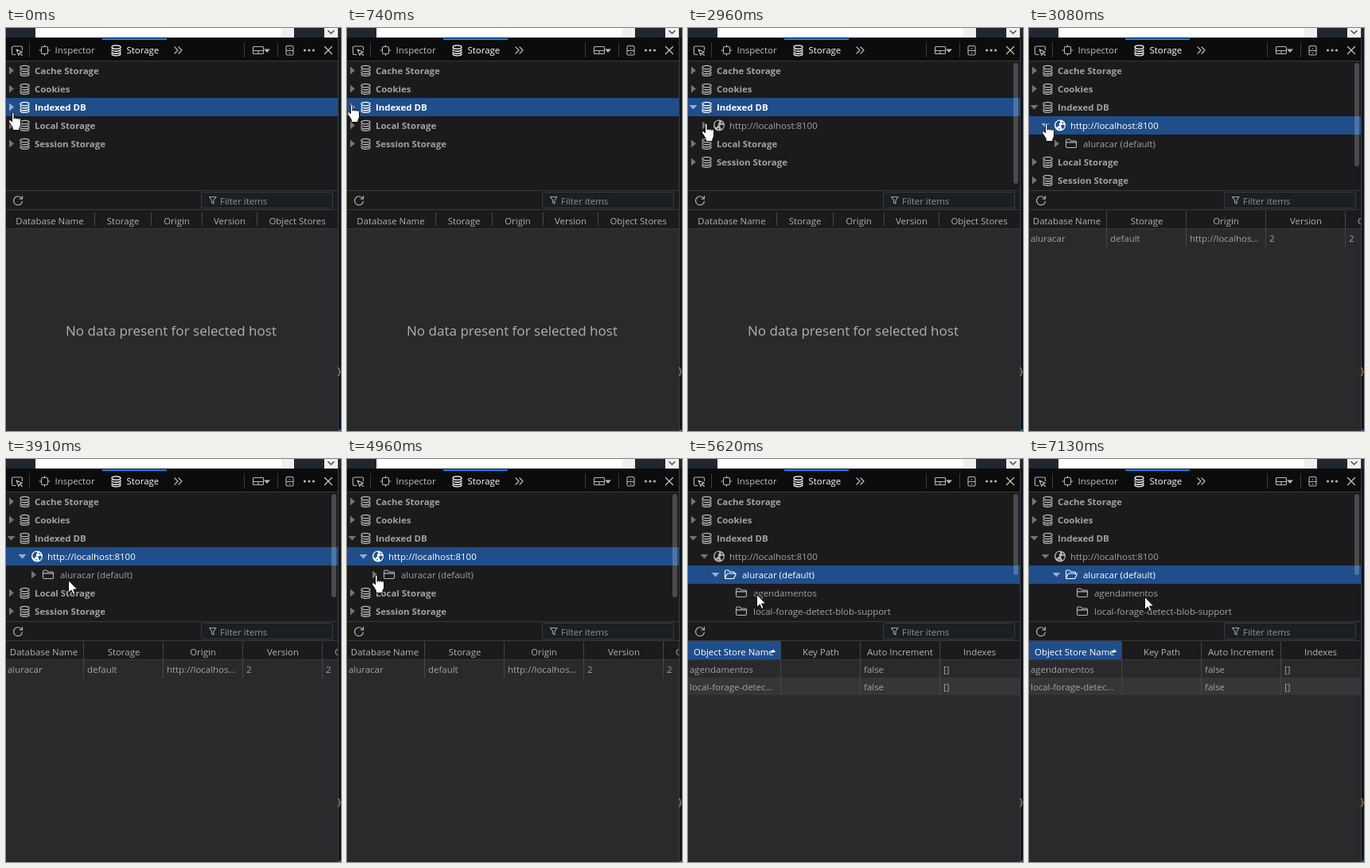
Animation of 421 by 507 pixels, one loop 8 s. Source, as an HTML page:

```html
<!DOCTYPE html>
<html lang="en">
<head>
<meta charset="utf-8">
<title>Storage inspector</title>
<style>
html, body { margin: 0; width: 100%; height: 100%; overflow: hidden; background: #1b1b1d; }
svg { display: block; width: 100vw; height: 100vh; }
text { font: 11.45px "Open Sans", "Noto Sans", sans-serif; fill: #a2a2a4; white-space: pre; }
.bold { font-weight: 700; }
.head { fill: #b1b1b3; }
.on { fill: #fff; }
.mid { text-anchor: middle; }
</style>
</head>
<body>
<svg id="stage" viewBox="0 0 421 507"></svg>
<script>
const LOOP = 8000;
const GREY = '#a2a2a4', ICON = '#b8b8ba', LINE = '#3a3a3e', DARK = '#1b1b1d', BODY = '#2a2a2d', BLUE = '#204e8a';

const rect = (x, y, w, h, fill, more = '') =>
  `<rect x="${x}" y="${y}" width="${w}" height="${h}" fill="${fill}" ${more}/>`;
const text = (x, y, s, cls = '', more = '') => `<text x="${x}" y="${y}" class="${cls}" ${more}>${s}</text>`;
const stroke = (d, color = GREY, w = 1.1, fill = 'none') =>
  `<path d="${d}" fill="${fill}" stroke="${color}" stroke-width="${w}" stroke-linejoin="round" stroke-linecap="round"/>`;
const at = (x, y, s) => `<g transform="translate(${x} ${y})">${s}</g>`;
const vline = (x, y, h, color = LINE) => rect(x, y, 1, h, color);

// Icons, centred on 0,0
const icons = {
  db: c => stroke('M-5.5-4a5.5 2.2 0 1 1 11 0a5.5 2.2 0 1 1-11 0M-5.5-1c0 3 11 3 11 0M-5.5 2c0 3 11 3 11 0M-5.5 4.6c0 3 11 3 11 0', c, 1.3),
  globe: (c, bg) => `<circle r="7" fill="${c}"/><path d="M-5.5-2l2-3 3-1 1 2-2 2 1 2-2 1-1 2-2-2zM1 0l3-1 2 1-1 3-2 2-1-2zM2-5l3 2-2 1zM-2 3l2 1-1 2z" fill="${bg}"/>`,
  folder: c => stroke('M-6.5-3.8q0-1.7 1.5-1.7h3l1.7 2h5.3q1.5 0 1.5 1.5v5.5q0 1.5-1.5 1.5h-10q-1.5 0-1.5-1.5zM-6-1.6h12', c),
  open: c => stroke('M-6.5 4v-8q0-1.5 1.5-1.5h3l1.7 2h4.3q1.5 0 1.5 1.5v1M-6.5 4.5l2.4-5q.4-1 1.4-1h9.2q1 0 .6 1l-2 4.5q-.4 1-1.4 1h-9q-1.2 0-1.2-.5z', c)
};
const twisty = (x, y, open, c) =>
  at(x, y, `<path d="${open ? 'M-5-2.5h10L0 3z' : 'M-2.5-5v10L3.5 0z'}" fill="${c}"/>`);

function treeRow([label, level, icon, state], i, selected) {
  const y = 53.5 + 23 * i, on = i === selected;
  return (on ? rect(0, 42 + 23 * i, 417, 23, BLUE) : '') +
    (state ? twisty(6.5 + 14 * level, y, state === 'v', on ? '#9aadca' : '#747476') : '') +
    at([23.5, 39, 53, 67][level], y, icons[icon](on ? '#fff' : ICON, on ? BLUE : DARK)) +
    text([36, 52, 68, 82][level], y + 4.3, label, (level ? '' : 'bold') + (on ? ' on' : ''));
}

const cut = (edges, y, h) => edges.map(x => vline(x, y, h, '#454549')).join('');
const heads = list => list.map(([x, s]) => text(x, 246.8, s, 'mid head')).join('');
const cells = (y, list) => list.map(([x, s]) => text(x, y, s)).join('');

const emptyTable =
  cut([111, 182, 246, 315], 232, 17) +
  heads([[55, 'Database Name'], [147, 'Storage'], [214.5, 'Origin'], [281, 'Version'], [366, 'Object Stores']]) +
  text(207.5, 387, 'No data present for selected host', 'mid head', 'style="font-size:17.05px"');

const dbTable =
  cut([97, 197, 297, 397], 230, 46) +
  heads([[47.5, 'Database Name'], [148, 'Storage'], [247.5, 'Origin'], [348, 'Version']]) +
  text(413, 246.8, 'Object Stores', 'head') +
  cells(269, [[2, 'aluracar'], [102, 'default'], [202, 'http://localhos...'], [302, '2'], [402, '2']]);

const storeTable =
  rect(0, 275, 417, 22, '#363638') + rect(0, 229, 116, 23, BLUE) +
  cut([116, 216, 316], 230, 67) +
  text(7, 246.8, 'Object Store Name', 'on') +
  '<path d="M104 243l3.2-3.5 3.2 3.5z" fill="#fff"/>' +
  heads([[167, 'Key Path'], [266.5, 'Auto Increment'], [366.5, 'Indexes']]) +
  cells(269, [[2, 'agendamentos'], [221, 'false'], [321, '[]']]) +
  cells(291, [[2, 'local-forage-detec...'], [221, 'false'], [321, '[]']]);

const root = (name, state = '>') => [name, 0, 'db', state];
const host = state => ['http://localhost:8100', 1, 'globe', state];
const top2 = [root('Cache Storage'), root('Cookies')];
const rest = [root('Local Storage'), root('Session Storage')];
const opened = [...top2, root('Indexed DB', 'v')];

const views = [
  { from: 0, rows: [...top2, root('Indexed DB'), ...rest], sel: 2, bar: 0, table: emptyTable },
  { from: 1860, rows: [...opened, host('>'), ...rest], sel: 2, bar: 152, table: emptyTable },
  { from: 3080, rows: [...opened, host('v'), ['aluracar (default)', 2, 'folder', '>'], ...rest], sel: 3, bar: 130, table: dbTable },
  { from: 5080, rows: [...opened, host('v'), ['aluracar (default)', 2, 'open', 'v'],
      ['agendamentos', 3, 'folder'], ['local-forage-detect-blob-support', 3, 'folder']], sel: 4, bar: 102, table: storeTable }
];

const drawView = v => `<g class="view" clip-path="url(#panel)">` +
  v.rows.map((r, i) => treeRow(r, i, v.sel)).join('') +
  (v.bar ? rect(409, 44, 6, v.bar, '#fff', 'opacity=".21" rx="3"') : '') + v.table + '</g>';

const toolbar =
  rect(0, 13, 417, 28, '#0c0c0d') + rect(0, 41, 417, 1, LINE) +
  stroke('M12 33.5h-3q-1.5 0-1.5-1.5v-7.5q0-1.5 1.5-1.5h10q1.5 0 1.5 1.5v3', ICON) +
  stroke('M13 27l7.5 3.2-3.2 1.1-1.3 3.2zM17.5 31.5l3 3', ICON) +
  vline(29, 18, 19) +
  stroke('M46 23.5h5q1.5 0 1.5 1.5v6q0 1.5-1.5 1.5h-5q-1.5 0-1.5-1.5v-6q0-1.5 1.5-1.500zM48.5 21.500v2M48.5 32.5v2M42 28h2.5M52.5 28h2.5', ICON) +
  text(61.5, 32, 'Inspector', '', 'style="fill:#c0c0c2"') +
  rect(121, 13, 81, 2, '#0a84ff') +
  at(138.5, 28, icons.db('#fff')) + text(151.5, 32, 'Storage', 'on') +
  stroke('M212 24l4 4-4 4M217 24l4 4-4 4', ICON, 1.3) +
  vline(299, 18, 19) +
  stroke('M311.5 23.5h11q1 0 1 1v7q0 1-1 1h-11q-1 0-1-1v-7q0-1 1-1zM310.5 28.5h13M317 28.5v4', ICON) +
  '<path d="M324 26.5h8l-4 4.5z" fill="#b8b8ba"/>' +
  vline(341, 18, 19) +
  stroke('M353.5 22.5h6q1.5 0 1.5 1.5v8.5q0 1.5-1.5 1.5h-6q-1.5 0-1.5-1.5v-8.5q0-1.5 1.5-1.5zM352.5 28.5h8M356 26h1M356 31.5h1', ICON) +
  [375.5, 381, 386.5].map(x => `<circle cx="${x}" cy="28" r="1.6" fill="${ICON}"/>`).join('') +
  stroke('M400.5 23.5l9 9M409.5 23.5l-9 9', '#c8c8ca', 1.2);

const filterBar =
  rect(0, 204, 417, 1, LINE) + rect(0, 228, 417, 1, LINE) +
  stroke('M19.5 214a5.5 5.5 0 1 0 1 4M20.5 211.5v3.5h-3.5', ICON, 1.2) +
  rect(245.5, 206.5, 165, 20, '#1a1f21', `stroke="${LINE}" rx="1"`) +
  stroke('M255.5 212.5h8.5l-3 4v4.5l-2.5-1.5v-3z', GREY) +
  text(269, 221.5, 'Filter items', '', 'style="fill:#929294"');

const frame =
  rect(0, 0, 421, 507, DARK) + rect(0, 0, 421, 12, '#202731') + rect(37, 0, 309, 12, '#fff') +
  rect(346, 0, 16, 12, '#f0f0f0') + rect(400, 0, 17, 12, '#f0f0f0') +
  stroke('M405 3.5l3.5 3.5 3.5-3.5', '#505050', 1.6) + rect(0, 12, 421, 1, '#0c0c0d') +
  rect(0, 253, 417, 254, BODY) + rect(0, 252, 417, 1, LINE) + toolbar + filterBar;

const edge =
  rect(417, 13, 4, 494, '#11161c') + rect(417, 0, 1, 507, '#3c3c40') +
  '<path id="brace" d="M417 427.5q2 0 2 2v1.500q0 1.500 1.500 1.500q-1.500 0-1.500 1.500v1.500q0 2-2 2" fill="none"/>' +
  rect(418, 505, 3, 2, '#0a639c');

const cursorShapes =
  '<path id="arrow" d="M.5.5v16l3.7-3.5 2.3 5.4 2.4-1-2.3-5.3h5z" fill="#fff" stroke="#000" stroke-width=".9"/>' +
  '<path id="hand" d="M6 .5c-1 0-1.5.7-1.5 1.5v10l-1.2-1.6c-.8-1-2.3-.6-2.6.4-.2.7 0 1.2.4 1.8l3 4.7c.5.8 1.2 1.5 1.2 2.5v2.7h8.6v-2.7c.5-1.2 1.6-2.5 1.6-4.3V9.3c0-2-2.6-2.2-2.7-.6 0-1.9-2.8-2-2.9-.3 0-1.9-2.8-1.9-2.9-.2V2C7.5 1.2 7 .5 6 .5z" fill="#fff" stroke="#000" stroke-width=".9"/>';

document.getElementById('stage').innerHTML =
  '<defs><clipPath id="panel"><rect width="417" height="507"/></clipPath></defs>' +
  frame + views.map(drawView).join('') + edge + cursorShapes;

// Pointer: runs of [time, x, y] held until the next one
const moves = [
  ['hand', [0, 3, 106], [160, 1, 103], [310, 0, 100], [460, 0, 98], [740, 0, 96]],
  ['arrow', [2390, 15, 105], [2540, 19, 112]],
  ['hand', [2690, 17, 118], [2810, 17, 120], [3080, 16, 120]],
  ['arrow', [3480, 40, 124], [3630, 52, 133], [3760, 65, 142], [3910, 78, 152], [4030, 94, 154],
    [4180, 90, 154], [4300, 97, 154], [4450, 100, 154], [4580, 79, 154], [4720, 58, 152]],
  ['hand', [4840, 33, 147], [4960, 31, 146], [5200, 30, 146]],
  ['arrow', [5350, 42, 151], [5470, 56, 157], [5620, 86, 170], [5740, 101, 175], [5890, 102, 175],
    [6040, 110, 174], [6320, 99, 174], [6440, 88, 174], [6590, 83, 174], [6710, 80, 172],
    [6860, 101, 173], [6980, 135, 173], [7130, 145, 173]]
].flatMap(([kind, ...steps]) => steps.map(([from, x, y]) => ({ kind, from, x, y })));

const current = (list, t) => list.findLast(s => s.from <= t);
const groups = [...document.querySelectorAll('.view')];
const pointers = ['arrow', 'hand'].map(id => document.getElementById(id));
const brace = document.getElementById('brace');

function render(t) {
  const view = current(views, t), p = current(moves, t);
  groups.forEach((g, i) => g.setAttribute('display', views[i] === view ? 'inline' : 'none'));
  pointers.forEach(el => {
    el.setAttribute('display', el.id === p.kind ? 'inline' : 'none');
    el.setAttribute('transform', `translate(${p.x} ${p.y})`);
  });
  brace.setAttribute('stroke', view.from ? '#c99f7e' : '#8fb7cc');
}

const start = performance.now();
function tick() {
  render((performance.now() - start) % LOOP);
  requestAnimationFrame(tick);
}
tick();
</script>
</body>
</html>
```
